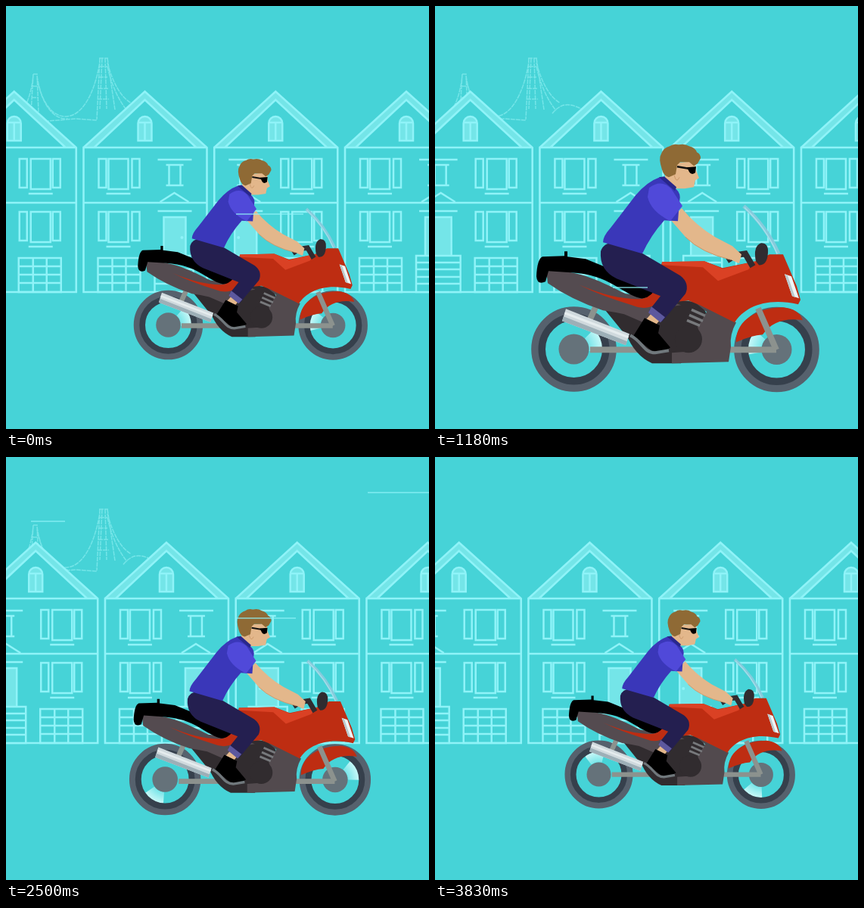
An HTML page with a canvas for the animation above (3.98 s loop, 559 by 559 pixels).

```html
<!DOCTYPE html>
<html lang="en">
<head>
<meta charset="utf-8">
<title>Motorcycle ride</title>
<style>
html, body { margin: 0; height: 100%; overflow: hidden; background: #46d3d7; }
canvas { display: block; }
</style>
</head>
<body>
<canvas id="stage" width="559" height="559"></canvas>
<script>
const ctx = document.getElementById('stage').getContext('2d');
const BG = '#46d3d7', LINE = '#8ff3f8', PALE = '#74e5e8';
const LOOP = 3980, PITCH = 172.75;
const SHORT_STEPS = [5, 7, 10, 13, 15, 20, 23];

function fill(color, d) {
  ctx.fillStyle = color;
  ctx.fill(new Path2D(d));
}
function stroke(color, width, d) {
  ctx.strokeStyle = color;
  ctx.lineWidth = width;
  ctx.stroke(new Path2D(d));
}
function disc(color, x, y, r) {
  ctx.fillStyle = color;
  ctx.beginPath();
  ctx.arc(x, y, r, 0, 7);
  ctx.fill();
}
function ring(color, x, y, inner, outer, from = 0, to = Math.PI * 2) {
  ctx.strokeStyle = color;
  ctx.lineWidth = outer - inner;
  ctx.beginPath();
  ctx.arc(x, y, (inner + outer) / 2, from, to);
  ctx.stroke();
}

function bridge() {
  ctx.setLineDash([6, 1]);
  stroke(PALE, 1.5, `M36 90h5L43 141M36 90L33 141M35 106h6M34 121h8
    M123 69h12M124 69L120 150M127 69L124 136M131 69L133 136M134 69L144 137
    M124 80h10M123 94h11M122 109h13M121 123h15
    M17 145Q32 128 36 92M41 92C46 128 62 147 80 146S116 122 124 74
    M41 96C48 132 64 151 82 149
    M134 75Q145 116 165 128M134 80Q143 118 160 138
    M44 153L92 149L120 151M155 142Q166 128 180 131T205 145`);
  ctx.setLineDash([]);
}

function upperWindows(y) {
  return `M-61 ${y}h10v38h-10zM-48 ${y}h26v40h-26zM-17 ${y}h10v38h-10z
    M-51 ${y + 46}h32`;
}

function house(x, mirrored) {
  ctx.save();
  ctx.translate(x, 0);
  fill(BG, 'M-81 187L0 113L82 187V379H-81Z');
  fill(PALE, 'M-81 187L0 113L82 187H68L0 124L-67 187Z');
  stroke(LINE, 2.6, `M-81 187L0 113L82 187V378H-81V187H82M-81 260H82
    M-67 187L0 124L68 187`);
  if (mirrored) ctx.scale(-1, 1);
  const attic = 'M-9 178V155A9 9 0 0 1 9 155V178Z';
  fill(PALE, attic);
  stroke(LINE, 2.5, attic + 'M-9 154H9M0 154V178');
  fill(PALE, 'M25 279h29v99h-29z');
  stroke(LINE, 2.5, upperWindows(202) + upperWindows(272) +
    `M-62 333h56v45h-56zM-62 344h56M-62 355h56M-62 366h56M-43 333v45M-25 333v45
    M17 203h45M28 210h23M28 237h23M32 210v27M47 210v27
    M20 259L39 247L58 259M17 271h45M25 330V279h29v51`);
  disc(LINE, 49, 306, 2);
  fill(BG, 'M13 330h51v48h-51z');
  stroke(LINE, 2.5, 'M13 330h51v48h-51zM13 339h51M13 348h51M13 358h51M13 367h51');
  ctx.restore();
}

function wheel(x, y, angle) {
  const shine = ctx.createRadialGradient(x, y, 18, x, y, 38);
  shine.addColorStop(0, '#6fe3e7');
  shine.addColorStop(1, '#c9f8f8');
  ring(shine, x, y, 20, 38, angle - .45, angle + .45);
  ring('#56616d', x, y, 46, 56.3);
  ring('#36404c', x, y, 37.5, 47);
  disc('#65727a', x, y, 20);
}

function bike(step) {
  const spin = (-22 + 135.4 * step) * Math.PI / 180;
  wheel(183.5, 453.5, spin);
  wheel(451.5, 454, spin + 3.75);

  // Suspension sway of everything above the wheels
  ctx.translate(0, 1.2 - 1.6 * Math.cos((step - 4.5) * Math.PI / 11));

  // Frame and exhaust
  stroke('#8c928e', 8, 'M205 454H290M388 454H451M212 398L201 422');
  fill('#312c2f', 'M252 432L300 385L352 392L358 405L352 440L325 472H287Q264 462 252 432Z');
  fill('#524a4e', `M343 391L398 418Q389 434 391 450L388 470L313 472
    V458L340 456Q354 442 347 424L359 404Z`);
  disc('#312c2f', 335, 440, 18);
  stroke('#77797c', 3.5, 'M339 401l18 8M336 408l18 8M333 415l17 7');
  fill('#312c2f', 'M222 398L272 403L290 412L264 436L248 430Z');
  fill('#544b50', `M147 349C195 349 220 365 252 380L300 386L325 395L306 398
    L280 420L250 407Q236 404 222 402Q180 388 149 366Z`);
  fill('#cfd9dd', 'M173 400L257 433L252 448L168 416Z');
  fill('#9dafb7', 'M170 410L254 443L252 448L168 416Z');
  fill('#e5ecee', 'M172 404L256 436L255 439L171 407Z');

  // Bodywork
  fill('#000', `M142 331L171 330V324H175V331L199 334L295 373Q286 387 272 386
    C246 380 232 355 180 352L150 350L146 364Q135 369 134 357Q135 334 142 331Z`);
  fill('#be2d12', `M190 368C220 381 246 387 269 387Q282 387 290 376L300 338
    L356 337L380 346L424 337L442 328H460L478 370L483 388L480 394
    C438 384 408 398 396 418L350 395L335 389L293 393Q279 403 260 395
    Q220 383 190 368Z`);
  fill('#da4124', 'M300 338L356 337L380 347L424 337L414 348L374 363L354 345L300 342Z');
  fill('#be2d12', `M398 444C397 413 430 398 460 398Q481 400 486 415
    C464 411 444 417 433 434Q418 435 398 444Z`);
  stroke('#8c928e', 8, 'M427 399L451 454');
  fill('#eef6f7', 'M462 354L471 357L481 386L472 383Z');
  fill('#b9c9cd', 'M462 354L466 356L476 385L472 383Z');
  stroke('#85cbdc', 5, 'M408 264Q438 291 454 327');
  stroke('#a5dfea', 1.5, 'M409 266Q437 292 452 327');

  // Leg and boot
  fill('#e3b78b', 'M286 406L297 415L291 422L279 414Z');
  fill('#000', 'M277 412L297 422L295 432L311 451Q302 459 286 455L262 436Z');
  stroke('#70787c', 4, 'M258 435C274 443 276 458 291 458L309 455');
  fill('#241f50', `M219 324Q223 311 240 313L273 326L324 356Q337 366 331 380
    L300 417L283 402L298 383L240 360Q217 349 219 324Z`);
  fill('#5c589e', 'M286 397L304 411L298 418L282 405Z');

  // Handlebar, arm and torso
  stroke('#302c30', 8, 'M386 336L397 329L410 327L420 344');
  fill('#302c30', 'M424 337Q420 317 431 313Q441 313 440 326Q439 343 428 342Z');
  fill('#e3b78b', `M311 282L326 267Q345 290 370 305L393 317L405 328L402 340
    L391 335Q352 326 331 305Z`);
  stroke('#c99668', 1, 'M331 305Q352 326 391 335');
  fill('#3a37b9', `M297 226L318 241Q326 248 323 258L321 284L303 283
    Q285 303 274 327L222 312Q222 304 232 293L265 250Q280 232 297 226Z`);
  fill('#5049d9', 'M283 240Q299 228 312 241L327 264L311 284Q285 271 281 252Z');

  // Head
  fill('#e3b78b', `M304 220L316 207L344 205L345 217L349 227L344 230L342 239
    L330 241L318 241L304 229Z`);
  fill('#29278c', 'M296 226L303 225L319 239L317 244Z');
  fill('#8f6a35', `M300 216Q295 201 299 195Q302 187 310 185Q315 181 322 183
    Q330 181 336 185Q344 187 346 193Q351 195 351 201L347 208L342 211L336 206
    L324 206L320 210L318 222L309 226Q302 224 300 216Z`);
  stroke('#c99668', 1, 'M316 223Q319 235 323 226');
  stroke('#111', 2.5, 'M320 212L338 215');
  fill('#000', 'M333 213L345 212L344 220Q339 224 336 219Z');
}

// Streaks: step at which x applies, x, y, length
const streaks = [
  [0, 304, 275, 89], [3, 270, 38, 90], [3, 390, 115, 45], [3, 400, 361, 90],
  [8, 235, 372, 46], [12, 476, 273, 90], [17, 478, 47, 90], [17, 33, 85, 45],
  [17, 305, 213, 78], [22, 146, 106, 91], [22, 392, 352, 115]
];

const ease = p => (1 - Math.cos(Math.PI * Math.min(1, Math.max(0, p)))) / 2;

function stepAt(time) {
  let step = 0;
  for (let end = 0; step < 26; step++) {
    end += SHORT_STEPS.includes(step) ? 140 : 150;
    if (time < end) break;
  }
  return step;
}

function draw(step) {
  ctx.fillStyle = BG;
  ctx.fillRect(0, 0, 559, 559);
  if (step < 26) bridge();

  const shift = step ? 187.7 - 39.22 * step : 183.5;
  const first = Math.floor((-90 - shift) / PITCH);
  for (let n = first; n < first + 6; n++) house(shift + n * PITCH, n % 2 !== 0);

  const scale = .8 + .2 * (ease((step + 1.2) / 7.5) - ease((step - 10.6) / 9));
  ctx.save();
  ctx.translate(348.5, 283.5);
  ctx.scale(scale, scale);
  ctx.translate(-348.5, -283.5);
  bike(step);
  ctx.restore();

  ctx.globalAlpha = .6;
  for (const [start, x, y, length] of streaks) {
    stroke(LINE, 2, `M${x - 230 * (step - start)} ${y}h${length}`);
  }
  ctx.globalAlpha = 1;
}

function tick() {
  draw(stepAt(performance.now() % LOOP));
  requestAnimationFrame(tick);
}
tick();
</script>
</body>
</html>
```
